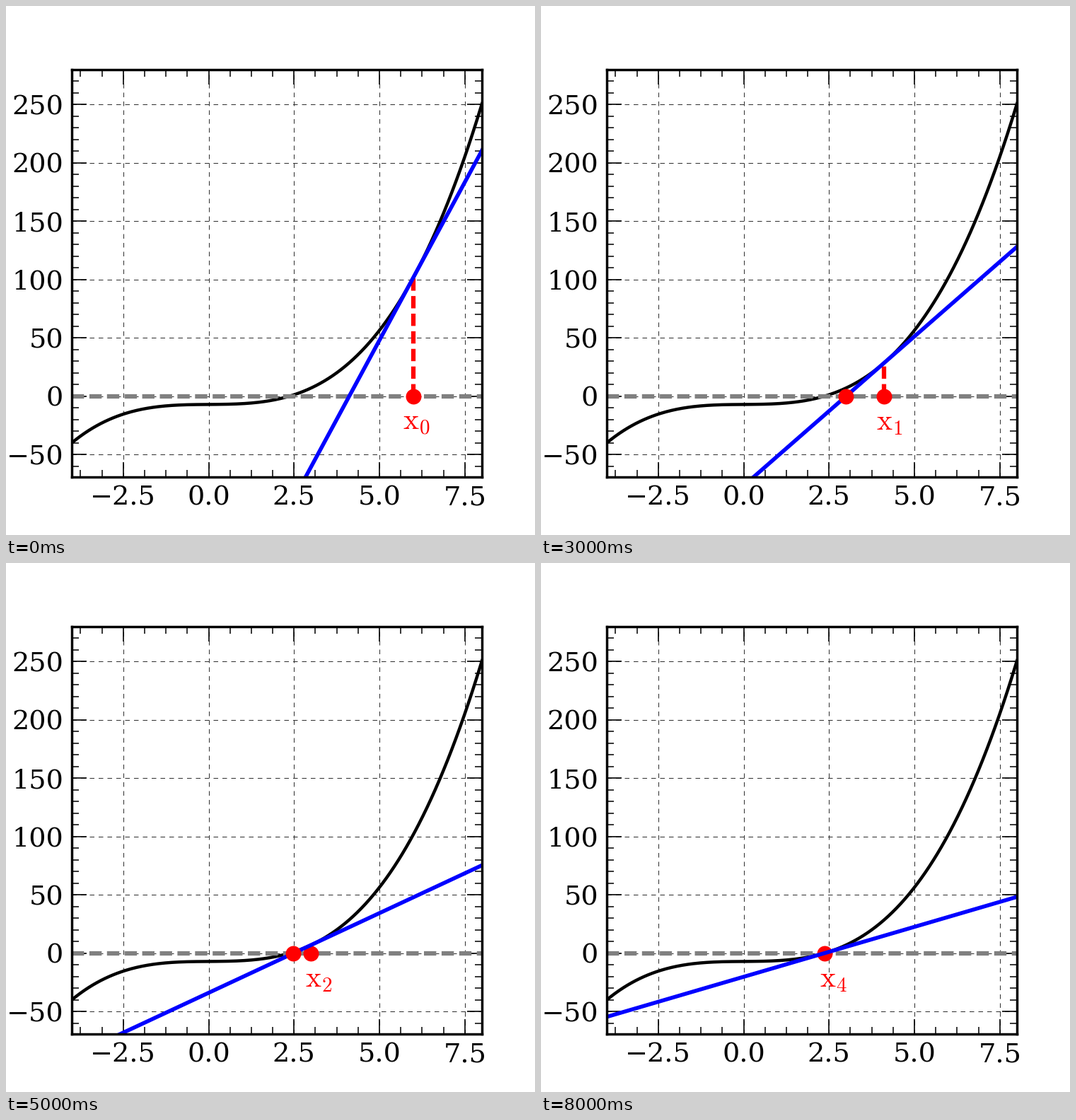
Animation, 748 px wide and 748 px high, one loop 9000 ms. Source, as a matplotlib script:

```python
import numpy as np
import matplotlib.pyplot as plt
from matplotlib.animation import FuncAnimation
from matplotlib.ticker import MultipleLocator

SIZE, DPI = 748, 500
STEPS = 5

plt.rcParams.update({
    "font.family": "DejaVu Serif",
    "mathtext.fontset": "cm",
    "axes.linewidth": 0.5,
})


def f(x):
    return x**3 / 2 + x / 5 - 7


def slope(x):
    return 1.5 * x**2 + 0.2


def dashed(width, on, off):
    """Line style with dash lengths given in pixels."""
    scale = 72 / DPI / width
    return dict(linewidth=width, linestyle=(0, (on * scale, off * scale)))


roots = [6.0]
while len(roots) < STEPS:
    x = roots[-1]
    roots.append(x - f(x) / slope(x))

fig = plt.figure(figsize=(SIZE / DPI, SIZE / DPI), dpi=DPI, facecolor="white")
ax = fig.add_axes([0.1247, 0.11, 0.775, 0.77])
ax.set_xlim(-4, 8)
ax.set_ylim(-69, 280)
ax.xaxis.set_major_locator(MultipleLocator(2.5))
ax.xaxis.set_minor_locator(MultipleLocator(0.625))
ax.yaxis.set_major_locator(MultipleLocator(50))
ax.yaxis.set_minor_locator(MultipleLocator(10))
ax.tick_params(which="both", direction="in", top=True, right=True)
ax.tick_params(which="major", length=3, width=0.24, pad=1.75, labelsize=5.5)
ax.tick_params(which="minor", length=1.5, width=0.22)
ax.grid(color="0.2", **dashed(0.15, 6.5, 6))
ax.set_axisbelow(True)

xs = np.linspace(-4, 8, 300)
ends = np.array([-4.0, 8.0])
thick = dashed(0.9, 17.4, 7.5)
dot = dict(color="red", marker="o", markersize=3.16, markeredgewidth=0)

ax.plot(xs, f(xs), color="black", lw=0.64, zorder=2.0)
ax.plot(ends, [0, 0], color="gray", zorder=2.1, **thick)
drop, = ax.plot([], [], color="red", zorder=2.2, **thick)
point, = ax.plot([], [], zorder=2.3, **dot)
tangent, = ax.plot([], [], color="blue", lw=0.8, zorder=2.35)
upcoming, = ax.plot([], [], zorder=2.4, **dot)
label = ax.text(0, -29, "", color="red", fontsize=6, zorder=3)


def draw(i):
    k, found = divmod(i, 2)
    x = roots[k]
    drop.set_data([x, x], [0, f(x)])
    point.set_data([x], [0])
    tangent.set_data(ends, f(x) + slope(x) * (ends - x))
    upcoming.set_data([roots[k + 1]] if found else [], [0] if found else [])
    label.set_x(0.95 * x - 0.02)
    label.set_text(rf"$\mathrm{{x}}_{k}$")
    return drop, point, tangent, upcoming, label


anim = FuncAnimation(fig, draw, frames=2 * STEPS - 1, interval=1000,
                     init_func=lambda: draw(0), repeat=True, repeat_delay=0)
plt.show()
```
